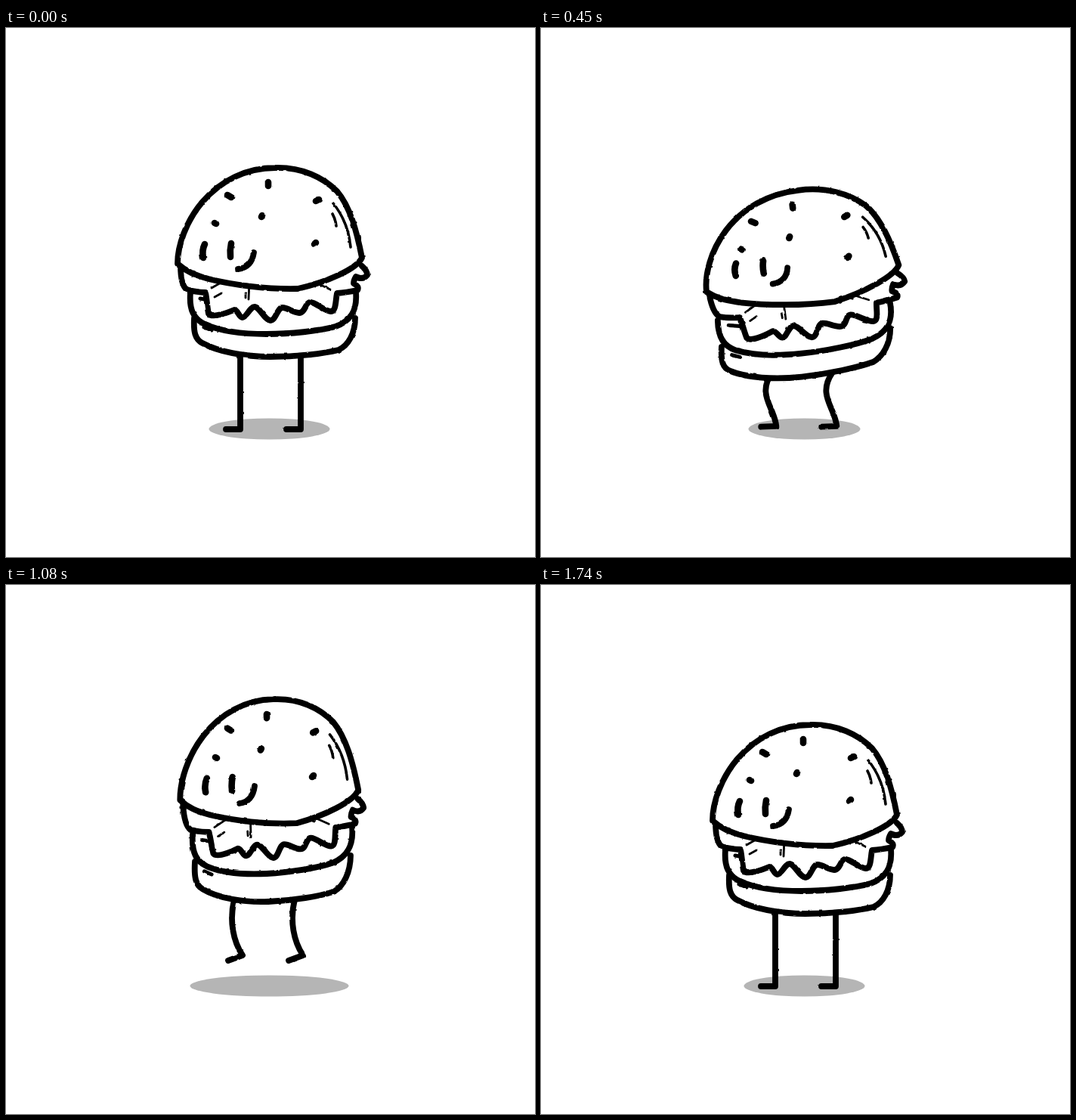
Animation of 700x700 px, one loop 1770 ms. Source, as an HTML page:

```html
<!DOCTYPE html>
<html lang="en">
<head>
<meta charset="utf-8">
<title>Jumping burger</title>
<style>
  html, body { margin: 0; width: 100%; height: 100%; overflow: hidden; background: #fff; }
  svg { display: block; width: 100vw; height: 100vh; }
  path { vector-effect: non-scaling-stroke; stroke-linecap: round; stroke-linejoin: round; }
  #shadow { fill: #b5b5b5; }
  #ink path { fill: none; stroke: #000; stroke-width: 7.8; }
  #ink .shape { fill: #fff; }
  #ink .seed { stroke-width: 8.6; }
  #ink .thin { stroke-width: 2.8; }
  #ink .shine { stroke-width: 3.6; }
  #ink .edge { stroke-width: 5; }
  #dash { fill: none; stroke: #595959; stroke-width: 6; }
</style>
</head>
<body>
<svg viewBox="0 0 700 700">
  <filter id="rough" filterUnits="userSpaceOnUse" x="0" y="0" width="700" height="700" color-interpolation-filters="sRGB">
    <feTurbulence type="fractalNoise" baseFrequency="0.15" numOctaves="1" seed="4"/>
    <feDisplacementMap in="SourceGraphic" scale="2.5" xChannelSelector="R" yChannelSelector="G"/>
  </filter>
  <ellipse id="shadow" cx="348.5" cy="530.5" ry="14"/>
  <g id="ink" filter="url(#rough)">
    <path id="legs"/>
    <g id="base">
      <path class="shape" d="M249 384C248 402 250 412 260 417C280 428 315 435 350 435C385 435 420 431 440 426C453 420 462 404 462 384"/>
      <path class="edge" d="M262 396L272 400"/>
    </g>
    <g id="patty">
      <path class="shape" d="M244 350C242 374 249 385 263 392C288 403 320 405 345 405C375 405 415 401 436 395C456 388 465 374 463 350"/>
      <path class="edge" d="M257 358L274 361"/>
    </g>
    <g id="lettuce">
      <path class="shape" d="M231 314Q231 340 239 346Q248 349 264 350C266 360 266 368 268 378C272 384 290 378 302 373C307 373 308 383 313 383S323 369 329 369S343 387 350 387S359 370 366 370S380 377 388 377S396 363 403 363S422 375 430 375C437 375 436 360 438 351Q450 350 465 347Q468 342 460 338Q460 334 463 329Q472 334 478 327Q478 321 471 315"/>
      <path class="thin" d="M272 344L293 332M276 356L285 351M322 335L321 359M317 351V357M402 333L429 346M402 339L409 342"/>
    </g>
    <g id="bun">
      <path class="shape" d="M227 312C227 288 238 256 260 230C284 202 318 185 356 185C392 184 420 198 438 216C455 236 464 268 471 304C464 319 425 336 386 345C345 346 300 340 268 332C250 327 238 322 227 312Z"/>
      <path class="seed" d="M347 204V209M293 221L298 224M276 258L278 259M339 248L338 250M410 229L414 227M408 286L410 284"/>
      <path class="shine" d="M433 232Q453 257 456 290M432 246Q436 253 437 262"/>
    </g>
    <g id="face">
      <path class="seed" d="M263 286Q259 294 261 304M298 285Q296 294 297 303"/>
      <path d="M328 297Q325 317 307 319"/>
    </g>
  </g>
  <path id="dash"/>
</svg>
<script>
const LOOP = 1770, STEP = 30;
const $ = id => document.getElementById(id);

// Three anchor points per part and pose place that part.
const parts = {
  bun: {
    rest: [347, 206, 277, 259, 409, 285], squat: [333, 240, 265, 297, 407, 307],
    rise: [332, 193, 271, 257, 402, 265], top: [344, 169, 278, 226, 405, 249],
    drop: [345, 173, 278, 229, 406, 253], land: [329, 230, 263, 289, 405, 295]
  },
  face: {
    rest: [261, 295, 328, 297, 307, 319], squat: [256, 322, 326, 320, 306, 341],
    rise: [264, 295, 328, 289, 312, 313], top: [265, 265, 329, 265, 310, 287],
    drop: [264, 265, 329, 266, 309, 289], land: [256, 303, 326, 299, 306, 321]
  },
  lettuce: {
    rest: [231, 325, 478, 325, 350, 387], squat: [223, 365, 482, 338, 359, 413],
    rise: [236, 334, 472, 296, 358, 374], top: [237, 298, 471, 291, 353, 358],
    drop: [235, 303, 473, 293, 354, 361]
  },
  patty: {
    rest: [244, 352, 463, 352, 345, 405], squat: [233, 393, 463, 370, 345, 435],
    rise: [244, 349, 455, 327, 343, 392], top: [249, 324, 459, 320, 347, 378],
    drop: [247, 332, 458, 322, 345, 382]
  },
  base: {
    rest: [249, 384, 462, 384, 350, 435], squat: [238, 427, 463, 402, 345, 466],
    rise: [248, 376, 456, 358, 346, 423], top: [253, 356, 456, 354, 350, 412],
    drop: [250, 366, 456, 358, 347, 419]
  }
};
// Hip, two curve handles, ankle, toe
const leg = {
  rest: [310, 430, 310, 465, 310, 500, 310, 531, 291, 531],
  squat: [306, 460, 284, 490, 310, 505, 311, 531, 291, 531],
  rise: [302, 420, 295, 450, 301, 475, 314, 492, 294, 501],
  top: [304, 408, 298, 440, 301, 468, 314, 485, 297, 498],
  drop: [302, 416, 295, 445, 301, 472, 313, 490, 294, 497]
};
const shadowWidth = { rest: [80], squat: [70], rise: [107], top: [112], drop: [105] };

const air = [[600, "rise"], [840, "top"], [1080, "drop"]];
const bodyKeys = [[0, "rest"], [270, "squat"], [410, "squat"], ...air,
  [1260, "squat"], [1410, "squat"], [1650, "rest"], [LOOP, "rest"]];
const headKeys = [[0, "rest"], [300, "squat"], [410, "squat"], ...air,
  [1320, "land"], [1425, "squat"], [1725, "rest"], [LOOP, "rest"]];

// Monotone cubic through the keys: smooth, without overshoot
function sample(keys, poses, t) {
  let i = 0;
  while (i < keys.length - 2 && t >= keys[i + 1][0]) i++;
  const time = k => keys[k][0], h = time(i + 1) - time(i), u = (t - time(i)) / h;
  return poses.rest.map((_, n) => {
    const val = k => poses[keys[k][1]][n];
    const slope = k => (val(k + 1) - val(k)) / (time(k + 1) - time(k));
    const tangent = k => {
      if (k === 0 || k === keys.length - 1) return 0;
      const a = slope(k - 1), b = slope(k);
      return a * b > 0 ? 2 * a * b / (a + b) : 0;
    };
    const v = 1 - u;
    return v * v * (1 + 2 * u) * val(i) + u * u * (3 - 2 * u) * val(i + 1)
      + h * u * v * (v * tangent(i) - u * tangent(i + 1));
  });
}

// Affine matrix that carries triangle p onto triangle q
function fit(p, q) {
  const [ux, uy, vx, vy] = [p[2] - p[0], p[3] - p[1], p[4] - p[0], p[5] - p[1]];
  const det = ux * vy - uy * vx;
  const row = k => {
    const du = q[2 + k] - q[k], dv = q[4 + k] - q[k];
    const mx = (du * vy - dv * uy) / det, my = (dv * ux - du * vx) / det;
    return [mx, my, q[k] - mx * p[0] - my * p[1]];
  };
  const [a, c, e] = row(0), [b, d, f] = row(1);
  return `matrix(${[a, b, c, d, e, f].map(n => n.toFixed(5))})`;
}

function legPath(p, dx) {
  const at = i => `${p[i] + dx} ${p[i + 1]} `;
  return `M${at(0)}C${at(2)}${at(4)}${at(6)}L${at(8)}`;
}

function dashes(t) {
  if (t < 510 || t > 840) return "";
  const grow = Math.sin(Math.min(1, (t - 500) / 200) * Math.PI / 2);
  const head = 360 + 143 * grow, tail = 360 + 143 * (t - 500) / 340;
  return `M216.5 ${tail}V${head}M492.5 ${tail - 42.5}V${head - 42.5}`;
}

function draw(t) {
  for (const id in parts) {
    const keys = id === "bun" || id === "face" ? headKeys : bodyKeys;
    $(id).setAttribute("transform", fit(parts[id].rest, sample(keys, parts[id], t)));
  }
  const p = sample(bodyKeys, leg, t);
  $("legs").setAttribute("d", legPath(p, 0) + legPath(p, 80));
  $("shadow").setAttribute("rx", sample(bodyKeys, shadowWidth, t)[0]);
  $("dash").setAttribute("d", dashes(t));
}

const start = performance.now();
function tick() {
  const t = (performance.now() - start) % LOOP;
  draw(Math.floor(t / STEP) * STEP);
  requestAnimationFrame(tick);
}
tick();
</script>
</body>
</html>
```
